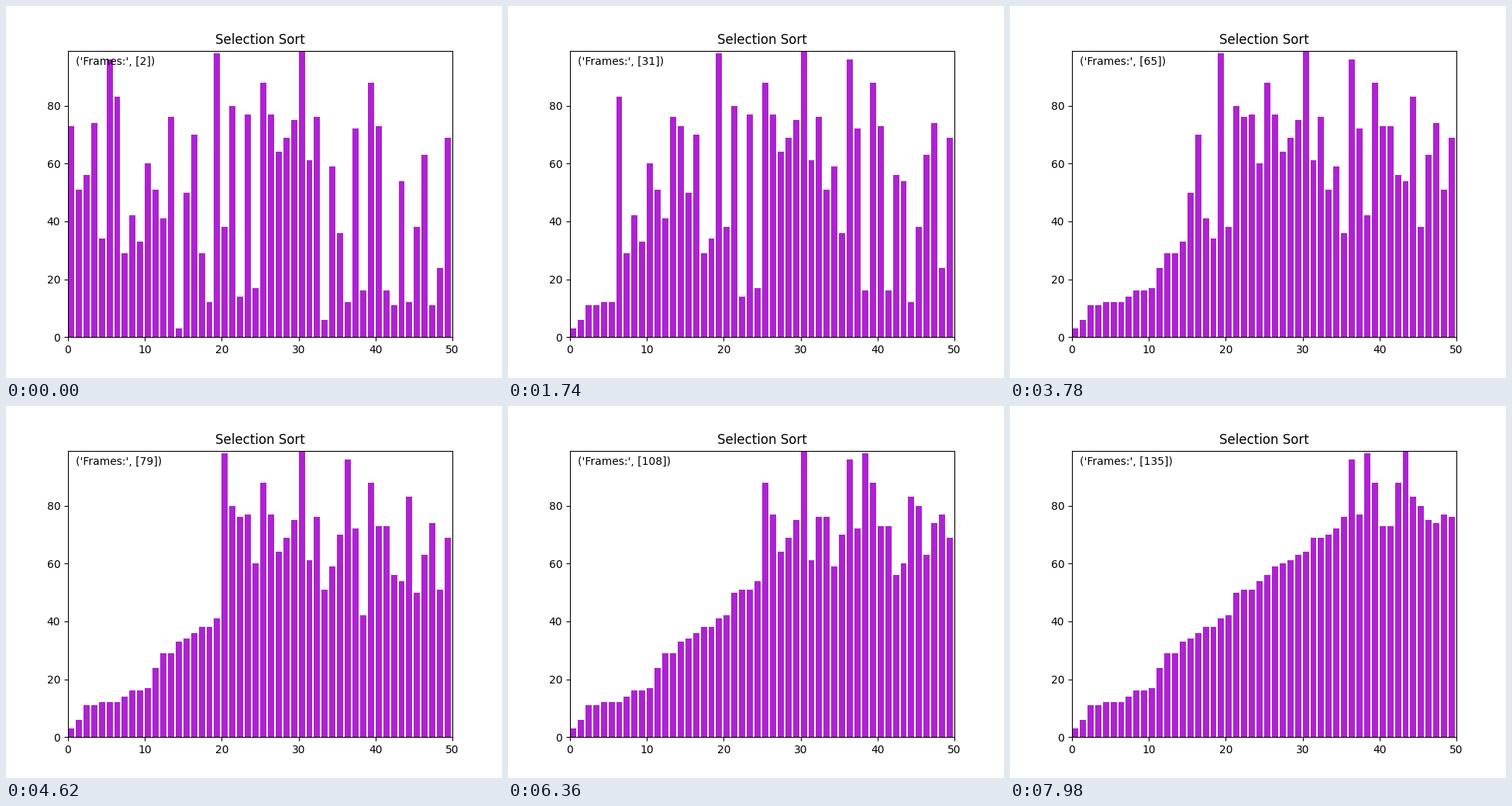
Animation of 640 by 480 pixels, one loop 8 s. Source, as a matplotlib script:

```python
import matplotlib.pyplot as plt
from matplotlib.animation import FuncAnimation

# The unsorted input; every later picture follows from sorting it.
VALUES = [73, 51, 56, 74, 34, 96, 83, 29, 42, 33, 60, 51, 41, 76, 3, 50, 70,
          29, 12, 98, 38, 80, 14, 77, 17, 88, 77, 64, 69, 75, 99, 61, 76, 6,
          59, 36, 12, 72, 16, 88, 73, 16, 11, 54, 12, 38, 63, 11, 24, 69]

LOOP_MS = 8000
TICK_MS = 20
TICKS_PER_STEP = 3
FIRST_STEP = 2


def selection_sort(values):
    """Yield the list after every new minimum and after every swap."""
    a = list(values)
    for i in range(len(a) - 1):
        low = i
        for j in range(i + 1, len(a)):
            if a[j] < a[low]:
                low = j
                yield a[:]
        a[i], a[low] = a[low], a[i]
        yield a[:]


states = list(selection_sort(VALUES))

fig, ax = plt.subplots(figsize=(6.4, 4.8), dpi=100)
ax.set_title("Selection Sort")
bars = ax.bar(range(len(VALUES)), VALUES, align="edge", color="#ae22d2")
ax.set_xlim(0, len(VALUES))
ax.set_ylim(0, max(VALUES))
label = ax.text(0.02, 0.95, "", transform=ax.transAxes)


def update(tick):
    step = FIRST_STEP + tick // TICKS_PER_STEP
    for bar, height in zip(bars, states[step - 1]):
        bar.set_height(height)
    label.set_text(str(("Frames:", [step])))
    return [*bars, label]


anim = FuncAnimation(fig, update, frames=LOOP_MS // TICK_MS,
                     interval=TICK_MS, repeat=True, repeat_delay=0)
plt.show()
```
